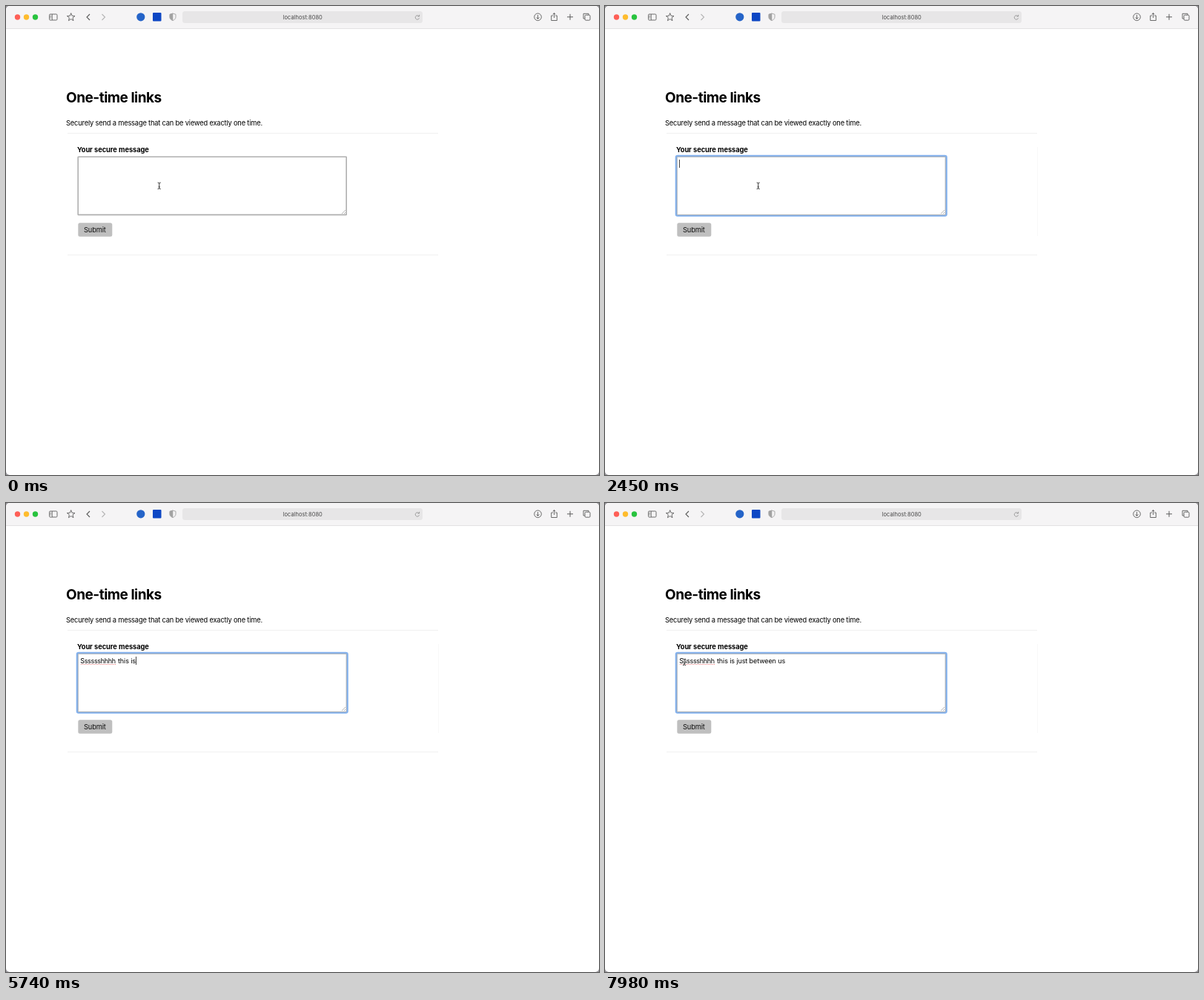
Animation, 800 px wide and 632 px high, one loop 8 s. Source, as an HTML page with a canvas:

```html
<!DOCTYPE html>
<html lang="en">
<head>
<meta charset="utf-8">
<title>One-time links</title>
<style>
  html, body { margin: 0; width: 100%; height: 100%; overflow: hidden; background: #fff; }
  canvas { display: block; width: 800px; height: 632px; }
</style>
</head>
<body>
<canvas id="stage" width="800" height="632"></canvas>
<script>
const ctx = document.getElementById('stage').getContext('2d');
const LOOP = 8000;
const STEP = 70;
const FOCUS_AT = 210;
const BLINK = 530;
const POINTER_BACK = 7560;

const FIRST_WORD = 'Sssssshhhh ';
const REST = 'this is just between us';
const FIRST_STYLE = { size: 9, spacing: -0.35 };
const REST_STYLE = { size: 9, spacing: -0.1 };

// Bursts of typing: [start, ms per key, number of keys]
const bursts = [[3080, 165, 11], [4960, 114, 14], [6540, 100, 9]];
const keyTimes = bursts.flatMap(([start, gap, count]) =>
  Array.from({ length: count }, (_, i) => start + i * gap));

function setFont({ size, spacing = 0, weight = 400 }) {
  ctx.font = `${weight} ${size}px Inter, sans-serif`;
  ctx.letterSpacing = spacing + 'px';
}

function text(string, x, y, style) {
  setFont(style);
  ctx.fillStyle = style.color || '#000';
  ctx.fillText(string, x, y);
  return x + ctx.measureText(string).width;
}

function box(x, y, w, h, r, fill, stroke, width = 1) {
  ctx.beginPath();
  ctx.roundRect(x, y, w, h, r);
  if (fill) { ctx.fillStyle = fill; ctx.fill(); }
  if (stroke) { ctx.strokeStyle = stroke; ctx.lineWidth = width; ctx.stroke(); }
}

function disc(x, y, r, color) {
  ctx.beginPath();
  ctx.arc(x, y, r, 0, Math.PI * 2);
  ctx.fillStyle = color;
  ctx.fill();
}

function path(d, color, width = 1, fill) {
  const shape = new Path2D(d);
  if (fill) { ctx.fillStyle = fill; ctx.fill(shape); }
  ctx.strokeStyle = color;
  ctx.lineWidth = width;
  ctx.stroke(shape);
}

function star(x, y, r) {
  const points = Array.from({ length: 10 }, (_, i) => {
    const angle = i * Math.PI / 5 - Math.PI / 2;
    const radius = i % 2 ? r * 0.43 : r;
    return `${x + radius * Math.cos(angle)} ${y + radius * Math.sin(angle)}`;
  });
  path(`M${points.join('L')}Z`, '#5c5c5c', 0.9);
}

function drawToolbar() {
  const ink = '#5c5c5c';
  ctx.fillStyle = '#f5f4f5';
  ctx.fillRect(0, 0, 800, 30);
  ctx.fillStyle = '#e2e2e2';
  ctx.fillRect(0, 30, 800, 1);
  ['#fe5f57', '#febc2e', '#28c33f'].forEach((color, i) => disc(15.5 + 12 * i, 15, 3.7, color));

  box(58.5, 11, 10.5, 8, 1.3, null, ink, 0.9);
  path('M62.3 11V19M59.7 13H61.2M59.7 14.6H61.2M59.7 16.2H61.2', ink, 0.8);
  star(87.7, 15.2, 5.6);
  path('M113 11L109 15L113 19', ink, 1.1);
  path('M129.5 11L133.5 15L129.5 19', '#b5b5b5', 1.1);

  disc(181.8, 14.8, 5.6, '#2564c8');
  box(198, 9, 11.5, 11.5, 1, '#0d47c4');
  path('M225 10L229 11.3V15C229 17.3 227 18.7 225 19.6C223 18.7 221 17.3 221 15V11.3Z', '#a2a2a2', 0.9);
  path('M225 10L221 11.3V15C221 17.3 223 18.7 225 19.6Z', '#a2a2a2', 0.5, '#a2a2a2');

  box(238, 7, 324, 16, 3.5, '#e7e6e7');
  text('localhost:8080', 373.8, 18, { size: 7.5, color: '#484848' });
  path('M557.2 14A2.7 2.7 0 1 0 557.5 16.3M555.4 14H557.6V11.8', '#8c8c8c', 0.8);

  path('M722.3 14.8A4.8 4.8 0 1 1 712.7 14.8A4.8 4.8 0 1 1 722.3 14.8M717.5 12V17.3M715.5 15.4L717.5 17.4L719.5 15.4', ink, 0.9);
  path('M738 13H735.7V19.5H743.3V13H741M739.5 16V9.6M737.6 11.3L739.5 9.4L741.4 11.3', ink, 0.9);
  path('M757 14.8H765M761 10.8V18.8', ink, 1);
  path('M780.7 17H779V10.3H786V12', ink, 0.9);
  box(781, 12.2, 7, 7, 1.2, null, ink, 0.9);
}

function drawForm(focused) {
  text('One-time links', 81, 130.3, { size: 19, spacing: -0.5, weight: 700 });
  text('Securely send a message that can be viewed exactly one time.', 81, 160.5, { size: 9.3, spacing: -0.18 });

  ctx.fillStyle = '#f0f0f0';
  ctx.fillRect(83, 171, 500, 1);
  ctx.fillRect(83, 335, 500, 1);
  if (focused) {
    ctx.fillStyle = '#f8f8f8';
    ctx.fillRect(583, 190, 1, 120);
  }

  text('Your secure message', 96, 197, { size: 9.3, spacing: -0.05, weight: 700 });
  if (focused) box(96, 202, 364.5, 80.5, 2, null, '#82b1ee', 2.6);
  box(97.2, 203.2, 362, 78.2, 0.5, '#fff', focused ? '#a3a8b0' : '#b0b0b0', focused ? 1 : 1.6);
  path('M453 280L458 275M456 280L458 278', '#999', 0.7);

  box(97.3, 292.3, 46, 18.5, 2.5, '#bfbfbf');
  text('Submit', 105, 304.8, { size: 9.3, spacing: -0.15, color: '#111' });
}

function drawMessage(t) {
  const typed = keyTimes.filter(time => time <= t).length;
  let caretX = text(FIRST_WORD.slice(0, typed), 100.3, 216, FIRST_STYLE);
  if (typed >= FIRST_WORD.length) {
    ctx.setLineDash([1, 1]);
    path('M101 217.5H148', '#ee7d7d', 1);
    ctx.setLineDash([]);
    caretX = text(REST.slice(0, typed - FIRST_WORD.length), 151, 216, REST_STYLE);
  }
  const blinkStart = typed ? keyTimes[typed - 1] : FOCUS_AT;
  if ((t - blinkStart) % (2 * BLINK) < BLINK) {
    ctx.fillStyle = '#444';
    ctx.fillRect(Math.round(caretX), 207, 1, 11);
  }
}

function drawPointer(t) {
  if (t >= keyTimes[0] && t < POINTER_BACK) return;
  const p = Math.min(1, Math.max(0, (t - POINTER_BACK) / 380));
  const ease = p * p * (3 - 2 * p);
  const x = 206.7 - 99.7 * ease;
  const y = 242.3 - 28 * ease;
  const beam = `M${x - 2} ${y - 4.3}Q${x} ${y - 4.3} ${x} ${y - 3}V${y + 3}Q${x} ${y + 4.3} ${x - 2} ${y + 4.3}` +
    `M${x + 2} ${y - 4.3}Q${x} ${y - 4.3} ${x} ${y - 3}M${x} ${y + 3}Q${x} ${y + 4.3} ${x + 2} ${y + 4.3}` +
    `M${x - 1} ${y + 1.5}H${x + 1}`;
  path(beam, '#fff', 2);
  path(beam, '#222', 0.9);
}

function render(now) {
  const t = Math.floor((now % LOOP) / STEP) * STEP;
  const focused = t >= FOCUS_AT;
  ctx.fillStyle = '#99979c';
  ctx.fillRect(0, 0, 800, 632);
  ctx.save();
  box(0, 0, 800, 632, 5, '#fff');
  ctx.clip();
  drawToolbar();
  drawForm(focused);
  if (focused) drawMessage(t);
  drawPointer(t);
  ctx.restore();
  requestAnimationFrame(render);
}

requestAnimationFrame(render);
</script>
</body>
</html>
```
